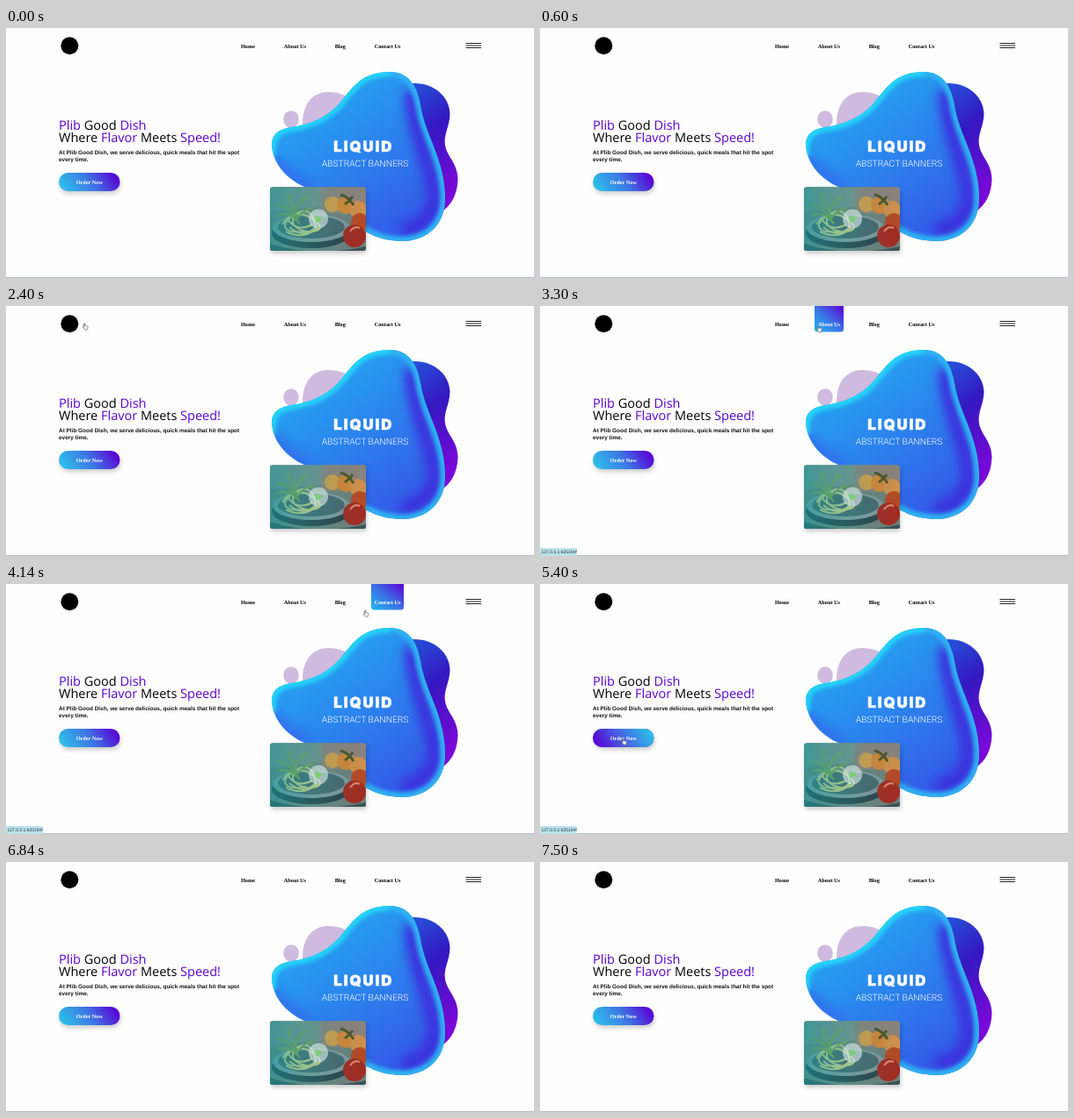
Animation of 600 by 285 pixels, one loop 7560 ms. Source, as an HTML page:

```html
<!DOCTYPE html>
<html lang="en">
<head>
<meta charset="utf-8">
<title>Fast food landing page</title>
<style>
html, body { margin: 0; width: 100%; height: 100%; overflow: hidden; background: #fefefe; }
svg { display: block; width: 600px; height: 285px; }
text { text-rendering: geometricPrecision; white-space: pre; }
.serif { font: bold 6.25px "Liberation Serif", serif; }
.title { font: 14.5px "Open Sans", sans-serif; }
.copy { font: bold 6.43px "Liberation Sans", sans-serif; fill: #111; }
.accent { fill: #5a00d2; }
.white { fill: #fff; }
.big { font: 900 16.8px Inter, sans-serif; letter-spacing: 1.9px; stroke: #fff; stroke-width: .5; }
.thin { font: 300 10.3px Roboto, sans-serif; }
.url { font: 5px "Liberation Sans", sans-serif; fill: #234; }
.soft { filter: blur(6px); }
.rim { filter: blur(2px); }
.blur { filter: blur(.6px); }
.shade { filter: drop-shadow(1px 3px 2.5px #0003); }

/* Hover states switch hard; only the pointer glides. */
.on { opacity: 0; animation: 7.56s step-end infinite; }
.home { animation-name: home; }
.about { animation-name: about; }
.blog { animation-name: blog; }
.contact { animation-name: contact; }
.press { animation-name: press; }
.status { animation-name: status; }
.hand { animation-name: hand; }
.arrow { animation-name: arrow; }
.pointer { animation: glide 7.56s linear infinite; }
@keyframes home { 0%, 41.7% { opacity: 0 } 40.2% { opacity: 1 } }
@keyframes about { 0%, 45.6% { opacity: 0 } 43.5% { opacity: 1 } }
@keyframes blog { 0%, 48.5% { opacity: 0 } 47.1% { opacity: 1 } }
@keyframes contact { 0%, 55.2% { opacity: 0 } 50.3% { opacity: 1 } }
@keyframes press { 0%, 73.6% { opacity: 0 } 62.7% { opacity: 1 } }
@keyframes status { 0%, 57.5%, 74.5% { opacity: 0 } 42%, 64.3% { opacity: 1 } }
@keyframes hand { 0%, 36.5%, 55.2%, 73.6% { opacity: 0 } 30.9%, 40.2%, 62.7% { opacity: 1 } }
@keyframes arrow { 0%, 30.9%, 40.2%, 62.7%, 81.7% { opacity: 0 } 28.6%, 36.5%, 55.2%, 73.6% { opacity: 1 } }
@keyframes glide {
  0%, 28.57% { transform: translate(140px, 0) }
  31.75% { transform: translate(88px, 19px) }
  35.7% { transform: translate(92px, 20px) }
  40.5% { transform: translate(270px, 20px) }
  44% { transform: translate(320px, 22px) }
  47.6% { transform: translate(378px, 22px) }
  51.6% { transform: translate(432px, 22px) }
  54.76% { transform: translate(407.5px, 29px) }
  62.7% { transform: translate(110px, 172px) }
  65.1%, 73% { transform: translate(93.5px, 175.5px) }
  81.7%, 100% { transform: translate(200px, -10px) }
}
</style>
</head>
<body>
<svg viewBox="0 0 600 285">
  <defs>
    <linearGradient id="pill" x1="0" y1=".6" x2="1" y2=".4">
      <stop stop-color="#2cc0ea"/><stop offset=".5" stop-color="#3d78e4"/><stop offset="1" stop-color="#5a00d4"/>
    </linearGradient>
    <linearGradient id="pillOn" x1="0" y1=".6" x2="1" y2=".4">
      <stop stop-color="#5a00d4"/><stop offset=".5" stop-color="#4569e2"/><stop offset="1" stop-color="#2cc0ea"/>
    </linearGradient>
    <linearGradient id="tab" x1="0" y1="1" x2="1" y2="0">
      <stop stop-color="#22b8ee"/><stop offset=".5" stop-color="#3b70e6"/><stop offset="1" stop-color="#5a00d4"/>
    </linearGradient>
    <linearGradient id="back" x1="0" y1="0" x2=".3" y2="1">
      <stop stop-color="#2458dc"/><stop offset=".45" stop-color="#3418c0"/><stop offset="1" stop-color="#7a08d8"/>
    </linearGradient>
    <linearGradient id="front" x1="0" y1="0" x2=".7" y2="1">
      <stop stop-color="#22b4f4"/><stop offset=".5" stop-color="#2a8aee"/><stop offset="1" stop-color="#3458e8"/>
    </linearGradient>
    <linearGradient id="tint">
      <stop stop-color="#149a9c" stop-opacity=".55"/><stop offset=".5" stop-color="#3a9890" stop-opacity=".25"/>
      <stop offset="1" stop-color="#704040" stop-opacity=".05"/>
    </linearGradient>
    <path id="liquid" d="M302 133C302 120 312 115 324 113C346 110 364 102 378 87C393 70 402 50 436 50C457 50 467 65 471 88C476 122 499 150 499 194C499 224 479 243 449 243C425 242 412 235 398 225C378 208 362 191 339 181C317 171 303 153 302 133Z"/>
    <clipPath id="liquidClip"><use href="#liquid"/></clipPath>
    <clipPath id="cardClip"><rect x="300" y="181.5" width="109" height="72.5" rx="3"/></clipPath>
  </defs>

  <circle cx="72.3" cy="20.3" r="10"/>
  <g class="serif">
    <text x="267" y="22.5">Home</text>
    <text x="315.8" y="22.5">About Us</text>
    <text x="373.7" y="22.5">Blog</text>
    <text x="418.7" y="22.5">Contact Us</text>
    <g class="white">
      <g class="on home"><path d="M263 0h24v26q0 3.5-3.5 3.5h-17q-3.5 0-3.5-3.5z" fill="url(#tab)"/><text x="267" y="22.5">Home</text></g>
      <g class="on about"><path d="M312 0h33v26q0 3.5-3.5 3.5h-26q-3.5 0-3.5-3.5z" fill="url(#tab)"/><text x="315.8" y="22.5">About Us</text></g>
      <g class="on blog"><path d="M370 0h20v26q0 3.5-3.5 3.5h-13q-3.5 0-3.5-3.5z" fill="url(#tab)"/><text x="373.7" y="22.5">Blog</text></g>
      <g class="on contact"><path d="M415 0h37v26q0 3.5-3.5 3.5h-30q-3.5 0-3.5-3.5z" fill="url(#tab)"/><text x="418.7" y="22.5">Contact Us</text></g>
    </g>
  </g>
  <path d="M522.5 17.5H540M522.5 20H540M522.5 22.500H540" stroke="#222" stroke-width="1"/>

  <text class="title" x="60" y="116"><tspan class="accent">Plib</tspan> Good <tspan class="accent">Dish</tspan></text>
  <text class="title" x="60" y="130">Where <tspan class="accent">Flavor</tspan> Meets <tspan class="accent">Speed!</tspan></text>
  <text class="copy" x="60" y="143.8">At Plib Good Dish, we serve delicious, quick meals that hit the spot</text>
  <text class="copy" x="60" y="152.3">every time.</text>

  <rect class="shade" x="60" y="165" width="69.5" height="21" rx="10.5" fill="url(#pill)"/>
  <rect class="on press" x="60" y="165" width="69.5" height="21" rx="10.5" fill="url(#pillOn)"/>
  <text class="serif white" x="79.7" y="178">Order Now</text>

  <g fill="#cfbbdf">
    <ellipse cx="324" cy="104" rx="8.8" ry="9.8"/>
    <path d="M337 112C336 86 349 73 366 73C381 73 390 78 393 86L370 120Z"/>
  </g>
  <path d="M455 64C482 59 504 76 504.500 98C504 113 497 121 499 134C502 148 513 154 513.500 172C513 193 503 207 488 213L465 180Z" fill="url(#back)"/>
  <use href="#liquid" fill="url(#front)"/>
  <g clip-path="url(#liquidClip)" fill="none">
    <g class="soft">
      <path d="M304 148Q322 172 346 180" stroke="#3468ec" stroke-width="10"/>
      <path d="M460 72C463 125 486 160 487 196Q482 226 450 231" stroke="#3c30dc" stroke-width="16"/>
    </g>
    <g class="rim">
      <path d="M301 146C299 118 314 115 324 113C346 110 364 102 378 87C393 70 402 50 436 50" stroke="#24d2f8" stroke-width="11"/>
      <path d="M436 50C457 50 467 65 471 88C476 122 499 150 499 194C499 224 479 243 449 243C425 242 412 235 398 225" stroke="#2eb2f2" stroke-width="11"/>
    </g>
  </g>
  <text class="big white" x="372.3" y="141">LIQUID</text>
  <text class="thin white" x="358.7" y="158">ABSTRACT BANNERS</text>

  <rect class="shade" x="300" y="181.5" width="109" height="72.5" rx="3" fill="#6f8f88"/>
  <g clip-path="url(#cardClip)">
    <rect x="300" y="181" width="109" height="74" fill="#6c8580"/>
    <g class="blur">
      <path d="M300 181h109v18l-109 10z" fill="#75928e"/>
      <path d="M358 181h52v30h-52z" fill="#8c8680"/>
      <ellipse cx="347" cy="234" rx="45" ry="17" fill="#24424c"/>
      <ellipse cx="347" cy="228" rx="44" ry="16" fill="#7f9fa2"/>
      <ellipse cx="347" cy="227" rx="38" ry="13" fill="#426a72"/>
      <circle cx="371" cy="201" r="9" fill="#d8a248"/>
      <circle cx="386" cy="202" r="10" fill="#d98a34"/>
      <circle cx="400" cy="207" r="10" fill="#d3944c"/>
      <circle cx="402" cy="221" r="10" fill="#b84a24"/>
      <circle cx="396" cy="237" r="13" fill="#a42a20"/>
      <path d="M391 232q5-7 11-4" stroke="#e08a70" stroke-width="2" fill="none"/>
      <path d="M380 190q9 2 15 12M394 192q-4 6-9 9" stroke="#43592d" stroke-width="3" fill="none"/>
      <path d="M300 246Q350 262 409 249v8H300z" fill="#38545a"/>
    </g>
    <path d="M314 224q14-21 36-5t-26 13q-16-6 4-19t24 14q-14 14-30 0M318 232q20 10 36-4M319 216q10 18 29 8M328 212q-8 16 14 20" fill="none" stroke="#c9d488" stroke-width="2"/>
    <path d="M307 202q14-1 22 17M320 188q3 14 12 29M342 192q-14 8-14 27M309 213q15-4 25 10M349 205q-12 1-20 15" fill="none" stroke="#79a84a" stroke-width="2.2"/>
    <rect x="300" y="181" width="109" height="74" fill="url(#tint)"/>
    <circle cx="355" cy="217.5" r="11" fill="#dcebe6" fill-opacity=".62"/>
    <path d="M352 213l8 4.5-8 4.5z" fill="#79cf72"/>
  </g>

  <rect y="284" width="600" height="1" fill="#b5bcc6"/>
  <g class="on status">
    <rect y="276" width="42" height="9" fill="#b9e3ea"/>
    <text class="url" x="1.5" y="282.3">127.0.0.1:62519/#</text>
  </g>
  <g class="pointer" fill="#fff" stroke="#333" stroke-width=".6" stroke-linejoin="round">
    <path class="on hand" d="M.5 1Q1 0 1.7 1V3.2Q4.5 3 5 4.5Q5 6.5 4 8H1.5Q.5 6-1 4.8Q-.7 3.8.5 4.8Z"/>
    <path class="on arrow" d="M0 0V7L1.6 5.5 2.7 8 3.8 7.5 2.7 5.1H5Z"/>
  </g>
</svg>
</body>
</html>
```
